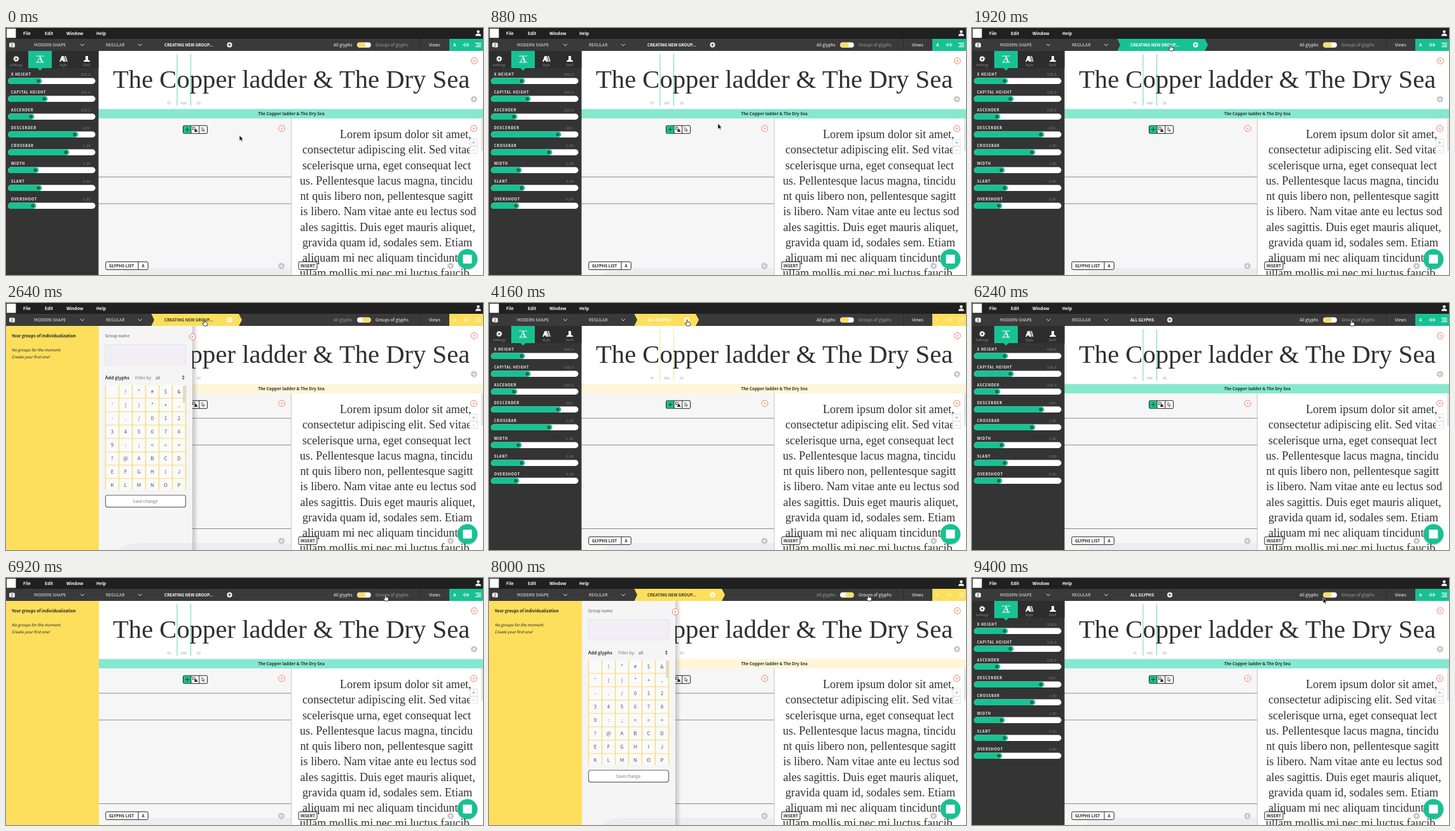
Write an HTML page that moves like this. It is 750 px wide and 388 px high and loops after 9.44 s.

```html
<!DOCTYPE html>
<html lang="en">
<head>
<meta charset="utf-8">
<title>Font editor</title>
<style>
html, body { margin: 0; width: 100%; height: 100%; overflow: hidden; background: #333; }
svg { display: block; width: 100vw; height: 100vh; }
text { font-family: "Noto Sans CJK SC", "Noto Sans CJK JP", "Noto Sans CJK", "Noto Sans", sans-serif; font-size: 6.65px; white-space: pre; }
.serif { font-family: "Liberation Serif", "Noto Serif", serif; }
.b { font-weight: 700; }
.m { font-weight: 500; }
.s { font-weight: 700; font-size: 6.35px; }
.i { font-style: italic; font-size: 6.2px; }
</style>
</head>
<body>
<svg id="stage" viewBox="0 0 750 388" preserveAspectRatio="none"></svg>
<script>
const LOOP = 9440;
const TITLE = 'The Copper ladder & The Dry Sea';
const GREEN = [24, 193, 147], YELLOW = [253, 223, 93];
const css = c => `rgb(${c.map(Math.round)})`;
const green = css(GREEN), yellow = css(YELLOW);

// Drawing helpers
const esc = s => s.replace(/&/g, '&amp;').replace(/</g, '&lt;').replace(/>/g, '&gt;');
const text = (x, y, s, fill = '#fff', more = '') =>
  `<text x="${x}" y="${y}" fill="${fill}" ${more}>${esc(s)}</text>`;
const rect = (x, y, w, h, fill, more = '') =>
  `<rect x="${x}" y="${y}" width="${w}" height="${h}" fill="${fill}" ${more}/>`;
const path = (d, stroke, width = 1, more = '') =>
  `<path d="${d}" fill="none" stroke="${stroke}" stroke-width="${width}" ${more}/>`;
const shape = (d, fill, more = '') => `<path d="${d}" fill="${fill}" ${more}/>`;
const circle = (x, y, r, fill, more = '') =>
  `<circle cx="${x}" cy="${y}" r="${r}" fill="${fill}" ${more}/>`;
const mid = 'text-anchor="middle"';

const gear = (x, y, color, s = 1) => `<g transform="translate(${x} ${y}) scale(${s})">` +
  circle(0, 0, 2.9, 'none', `stroke="${color}" stroke-width="2.2"`) +
  circle(0, 0, 4.6, 'none', `stroke="${color}" stroke-width="1.6" stroke-dasharray="1.9 1.713"`) + '</g>';
const closer = (x, y) => circle(x, y, 4.9, '#fff', 'stroke="#ee7b62" stroke-width="1"') +
  path(`M${x - 1.7} ${y - 1.7}l3.4 3.4m0 -3.4l-3.4 3.4`, '#ee7b62', .9);
const chevron = x => path(`M${x - 3} 25l3 3l3 -3`, '#ddd', 1);

function sidebar() {
  const rows = [['X HEIGHT', '500,0', 51], ['CAPITAL HEIGHT', '160,0', 60], ['ASCENDER', '220,0', 39],
    ['DESCENDER', '-220,', 108], ['CROSSBAR', '1,00', 94], ['WIDTH', '1,00', 46],
    ['SLANT', '0,00', 51], ['OVERSHOOT', '0,00', 42]];
  const small = 'style="font-size:5.4px" text-anchor="middle"';
  let s = rect(0, 36, 145.5, 352, '#343434') + rect(0, 36, 145.5, 27, '#2d2d2d') +
    shape('M35 36H72V63H57.5L53.5 67L49.5 63H35Z', green) +
    gear(16, 48.5, '#fff', .85) + text(16, 60, 'Settings', '#8c8c8c', small) +
    text(53.5, 53.4, 'A', '#fff', 'class="serif b" text-anchor="middle" style="font-size:13px"') +
    path('M47 44H60M47 54H60', '#fff', .9) +
    shape('M84 53L87.5 44H89.5L92 53H89.8L89.3 51H86.7L86 53Z', '#fff') +
    path('M90.5 44L93.3 53M93.3 44L96 53', '#fff', 1.4) + text(90, 60, 'Style', '#8c8c8c', small) +
    shape('M125 44H129V50L132 51.5V53H122V51.5L125 50Z', '#fff') + text(126.5, 60, 'Serif', '#8c8c8c', small);
  rows.forEach(([name, value, x], i) => {
    const y = 83.2 + 28 * i;
    s += text(8, y - 8.4, name, '#f2f2f2', 'class="b" style="font-size:5.6px;letter-spacing:.7px"') +
      text(133, y - 8.5, value, '#858585', 'text-anchor="end" style="font-size:5.4px;letter-spacing:.3px"') +
      rect(3, y - 4.6, 137.5, 9.4, '#fff', 'rx="4.7"') +
      rect(3, y - 4.6, x + 2.5, 9.4, green, 'rx="4.7"') +
      circle(x, y, 2.5, '#28473f') + circle(x, y, .8, green);
  });
  return s;
}

function workspace() {
  const lorem = [[525, 'Lorem ipsum dolor sit amet,'], [466, 'consectetur adipiscing elit. Sed vitae'],
    [466, 'scelerisque urna, eget consequat lect'], [462, 'us. Pellentesque lacus magna, tincidu'],
    [462.5, 'nt quis libero non, pellentesque sagitt'], [462.5, 'is libero. Nam vitae ante eu lectus sod'],
    [462.5, 'ales sagittis. Duis eget mauris aliquet,'], [466, 'gravida quam id, sodales sem. Etiam'],
    [466, 'aliquam mi nec aliquam tincidunt.'], [462, 'ullam mollis mi nec mi luctus faucib']];
  let s = rect(145, 36, 605, 352, '#fff') + rect(145, 142, 303.5, 246, '#f6f6f6') +
    '<g id="lines">' + [181, 223, 354.5].map(y => path(`M145 ${y}H448`, '#8a8a8a', 1)).join('') + '</g>' +
    path('M448.5 142V388', '#c9c9c9', 1) +
    path('M269 41V122M290.5 41V122', green, 1.1, 'id="guides"') +
    text(168, 93.9, TITLE, '#303030', 'class="serif" style="font-size:40.65px"') +
    [[256, '75'], [279.5, '600'], [303, '50']].map(([x, n]) =>
      text(x, 120, n, '#999', mid + ' style="font-size:5.4px"')).join('') +
    rect(145, 127.3, 605, 14.7, '#86e8ce', 'id="banner"') +
    text(448.5, 137.2, TITLE, '#26302d', mid + ' class="b" style="font-size:6.5px"');
  lorem.forEach(([x, line], i) => {
    s += text(x, 173 + 24.25 * i, line, '#333', 'class="serif" style="font-size:18.2px"');
  });
  return s +
    closer(736.3, 51.5) + closer(433.5, 157.8) + closer(735.5, 157.8) +
    gear(735.8, 111.8, '#c4c4c4') + gear(433, 373.8, '#c4c4c4') + gear(699, 373.8, '#c4c4c4') +
    rect(729.5, 174.5, 11.5, 11, '#fff', 'stroke="#dedede"') + rect(729.5, 186, 11.5, 11, '#fff', 'stroke="#dedede"') +
    path('M732.7 180H738M735.3 177.4V182.6M733.8 192H736.8', '#aaa', .9) +
    rect(747, 142, 3, 51, '#e5e5e5') +
    // tool buttons
    rect(278.5, 153.3, 38, 12.4, '#fff', 'rx="1.5" stroke="#222"') +
    rect(279, 153.8, 12, 11.4, green) + path('M291 153V166M303.7 153V166', '#222', 1) +
    path('M281.5 159.5H288.5M285 156V163', '#143c31', 1) +
    rect(293.5, 156, 3.5, 3.5, 'none', 'stroke="#222" stroke-width=".8"') +
    shape('M298.5 158L301.5 163H295.5Z', '#222') +
    path('M308 156V162L309.5 160.7L310.6 163L311.5 162.5L310.4 160.3H312.2Z', '#222', .7) +
    // bottom buttons
    rect(156.8, 367.2, 66.5, 12.4, '#fff', 'rx="2" stroke="#222"') + path('M208 367V380', '#222', 1) +
    text(162, 376, 'GLYPHS LIST', '#222', 'class="s"') + text(215.6, 376, 'A', '#222', mid + ' class="s"') +
    rect(460, 367.2, 29, 12.4, '#fff', 'rx="2" stroke="#222"') + text(463, 376, 'INSERT', '#222', 'class="s"') +
    // chat button
    circle(725.5, 364.5, 16.5, '#000', 'opacity=".12"') + circle(725.5, 363, 15.8, green) +
    rect(718.5, 356, 14, 14, '#fff', 'rx="1"');
}

function panel() {
  const glyphs = ' !"#$&\'()*+,-./0123456789:;<=>?@ABCDEFGHIJKLMNOP';
  let s = rect(293, 36, 9, 352, 'url(#shade)') + rect(145, 36, 148, 352, '#f5f5f5') +
    text(156, 53.6, 'Group name', '#8a8a8a', 'class="s"') +
    rect(156, 65.5, 126.5, 31.5, '#f2eef5', 'stroke="#e2e2ec"') +
    text(156, 119.5, 'Add glyphs', '#333', 'class="b" style="font-size:7px"') +
    text(203, 119.5, 'Filter by:', '#777') + text(235, 119.5, 'all', '#555') +
    shape('M276.8 116.2L278.8 113.6L280.8 116.2ZM276.8 117.8L278.8 120.4L280.8 117.8Z', '#555') +
    rect(156, 129, 126.5, 164.5, '#fafafa');
  for (let i = 0; i < 7; i++) s += path(`M${156.5 + 21 * i} 129V293.5`, '#f5dc74', 1.4);
  for (let i = 1; i < 8; i++) s += path(`M156 ${128.8 + 21 * i}H282.5`, '#f5dc74', 1);
  [...glyphs].forEach((g, i) => {
    s += text(167 + 21 * (i % 6), 142.2 + 21 * Math.floor(i / 6), g, '#555', mid + ' style="font-size:8px"');
  });
  return s + rect(278, 130, 4, 27, '#d6d2c6', 'opacity=".75"') +
    rect(156.5, 302, 126, 18.6, '#fff', 'rx="3" stroke="#666" stroke-width="1.2"') +
    text(219, 313.8, 'Save change', '#777', mid + ' class="m"') + closer(293, 53);
}

const groups = () => rect(0, 36, 146, 352, yellow) +
  text(9, 53.8, 'Your groups of individualization', '#222', 'class="b" style="font-size:6.45px"') +
  text(9, 75.6, 'No groups for the moment.', '#222', 'class="i"') +
  text(9, 86.8, 'Create your first one!', '#222', 'class="i"');

function bars() {
  const menu = [[27, 'File'], [61, 'Edit'], [95, 'Window'], [142, 'Help']];
  return rect(0, 0, 750, 17, '#202020') + rect(0, 17, 750, 19, '#3a3a3a') +
    rect(1, 1, 14.5, 14.5, '#fff') +
    menu.map(([x, s]) => text(x, 10.6, s, '#fff', 'class="b"')).join('') +
    circle(742.5, 5.8, 2.3, '#fff') + shape('M738 12.5Q738 8.7 742.5 8.7Q747 8.7 747 12.5Z', '#fff') +
    shape('M5 24L9 22.5V30.5L5 29.5ZM9.7 22.5L14 24V30L9.7 31Z', '#e8e8e8') +
    text(44, 29, 'MODERN SHAPE', '#e6e6e6', 'class="m"') + chevron(120) +
    text(157, 29, 'REGULAR', '#e6e6e6', 'class="m"') + chevron(211) +
    '<path id="tab"/>' + text(249, 29, '', '#fff', 'id="label" class="s"') +
    '<g id="plus">' + circle(0, 26.5, 4, '#fff') + path('M-2.3 26.5H2.3M0 24.2V28.8', '#3a3a3a', 1.1, 'id="cross"') + '</g>' +
    text(515, 29, 'All glyphs', '#fff', 'id="all" class="m"') +
    text(581, 29, 'Groups of glyphs', '#fff', 'id="some" class="m"') +
    rect(552, 22.6, 21.8, 8.2, '#fff', 'rx="4.1"') + rect(0, 23.1, 13, 7.2, yellow, 'rx="3.6" id="knob"') +
    path('M651.5 17V36', '#2b2b2b', 1) + text(665, 29, 'Views', '#fff', 'class="m"') +
    rect(697, 17, 53, 19, green, 'id="views"') +
    '<g id="icons">' + text(705.5, 29, 'A', '#fff', mid + ' class="b"') +
    path('M719.5 25V28M721.5 23.5V29.5M723.5 25.5V27.5M725.5 23.5V29.5M727.5 25V28', '#fff', 1) +
    path('M738 23.8H747M740 26.6H747M738 29.4H747', '#fff', 1.3) + '</g>';
}

const cursors =
  '<g id="arrow">' + shape('M0 0V9L2.1 7.1L3.5 10.2L5 9.5L3.6 6.6H6.4Z', '#111', 'stroke="#fff" stroke-width=".7"') + '</g>' +
  '<g id="hand">' + shape('M-.9 1Q0 -.6 .9 1V3.6Q2 3.1 2.4 4Q3.6 3.6 4 4.6Q5.2 4.6 5 6.2L4.2 9.5H-.6L-3 6Q-3 4.6 -1.7 5.2L-.9 6Z',
    '#fff', 'stroke="#111" stroke-width=".8"') + '</g>';

const stage = document.getElementById('stage');
stage.innerHTML = '<defs><linearGradient id="shade"><stop offset="0" stop-color="#000" stop-opacity=".2"/>' +
  '<stop offset="1" stop-color="#000" stop-opacity="0"/></linearGradient></defs>' +
  workspace() + `<g id="panel">${panel()}</g>` +
  shape('M178 388Q188 377 206 377H448V388Z', '#b4b4d2', 'opacity=".13"') +
  sidebar() + `<g id="groups">${groups()}</g>` + bars() + cursors;

const el = {};
stage.querySelectorAll('[id]').forEach(e => el[e.id] = e);
const set = (id, attrs) => { for (const k in attrs) el[id].setAttribute(k, attrs[k]); };
const show = (id, on) => set(id, { display: on ? 'inline' : 'none' });

// Motion
const ease = p => p * p * (3 - 2 * p);
const ramp = (t, a, b) => ease(Math.min(1, Math.max(0, (t - a) / (b - a))));
const mix = (a, b, p) => css(a.map((v, i) => v + (b[i] - v) * p));
const OPENS = [2080, 6920], CLOSES = [3920, 8780];
const moves = [[0, 367, 168.5], [700, 367, 168.5], [1500, 312, 26.5], [4800, 311.5, 26.5],
  [5800, 596.5, 26.5], [8100, 596.5, 26.5], [8700, 552, 31], [LOOP, 552, 31]];

function pointer(t) {
  const i = Math.max(1, moves.findIndex(m => m[0] > t));
  const [a, x, y] = moves[i - 1], [b, u, v] = moves[i], p = ramp(t, a, b);
  return [x + (u - x) * p, y + (v - y) * p];
}

// Sum of the two open/close pulses, each end shifted and eased
const pulse = (t, inTime, outDelay, outTime) => OPENS.reduce((sum, o, i) =>
  sum + ramp(t, o, o + inTime) - ramp(t, CLOSES[i] + outDelay, CLOSES[i] + outDelay + outTime), 0);

function draw(t) {
  const [x, y] = pointer(t);
  const open = OPENS.some((o, i) => t >= o && t < CLOSES[i]);
  const slide = pulse(t, 260, 0, 200);
  const warm = pulse(t, 260, 260, 320);
  const creating = t < OPENS[0] || open;
  const end = creating ? 371 : 330;
  const hover = x > 229 && x < end && y > 17 && y < 36;
  const accent = mix(GREEN, YELLOW, warm);

  set('guides', { stroke: mix([112, 218, 188], [250, 229, 143], warm) });
  set('banner', { fill: mix([134, 232, 206], [255, 245, 216], warm) });
  set('views', { fill: accent });
  set('icons', { opacity: 1 - .4 * warm });
  set('lines', { transform: `translate(0 ${t < OPENS[0] ? 53 : 0})` });

  show('panel', slide > .001);
  set('panel', { transform: `translate(${-160 * (1 - slide)} 0)` });
  show('groups', open);

  set('tab', {
    d: `M228.5 17H${end - 5}L${end} 26.5L${end - 5} 36H228.5L233 26.5Z`,
    fill: accent, opacity: hover ? 1 : warm
  });
  el.label.textContent = creating ? 'CREATING NEW GROUP...' : 'ALL GLYPHS';
  set('label', { fill: mix([255, 255, 255], [58, 54, 40], slide) });
  set('plus', { transform: `translate(${creating ? 351.5 : 311} 0)` });
  set('cross', { stroke: hover || warm > .5 ? accent : '#3a3a3a' });

  const side = pulse(t, 200, 0, 200);
  set('knob', { x: 552.5 + 7.8 * side });
  set('all', { fill: mix([255, 255, 255], [160, 160, 160], side) });
  set('some', { fill: mix([160, 160, 160], [255, 255, 255], side) });

  const hand = hover || (x > 575 && x < 635 && y < 36);
  show('hand', hand);
  show('arrow', !hand);
  set(hand ? 'hand' : 'arrow', { transform: `translate(${x} ${y})` });
}

const start = performance.now();
function tick(now) {
  draw(Math.max(0, now - start) % LOOP);
  requestAnimationFrame(tick);
}
draw(0);
requestAnimationFrame(tick);
</script>
</body>
</html>
```
